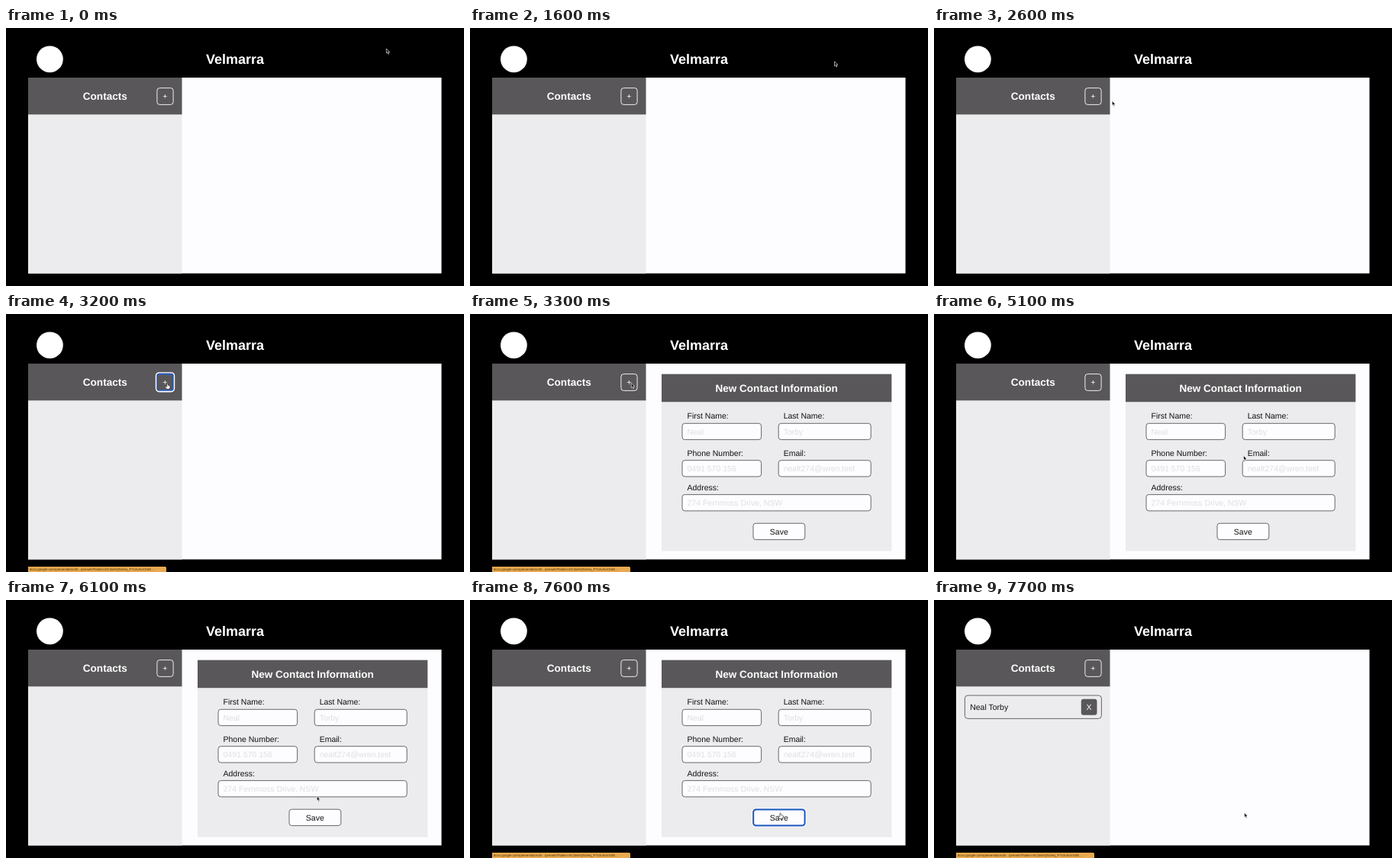
These frames come from a looping animation (600x338 px, 8000 ms). An HTML page:

```html
<!DOCTYPE html>
<html lang="en">
<head>
<meta charset="utf-8">
<title>Contacts</title>
<style>
  html, body { margin: 0; width: 100%; height: 100%; overflow: hidden; background: #000; }
  svg { display: block; width: 100vw; height: 100vh; }
  text { font: 10.5px "Liberation Sans", Arial, sans-serif; fill: #111; text-rendering: geometricPrecision; }
  .head { font-weight: bold; font-size: 13.55px; fill: #fff; text-anchor: middle; }
  .mid { text-anchor: middle; }
  .light { fill: #fff; }
  .hint { fill: #dfdee1; }
  .dark { fill: #595759; }
  .pale { fill: #ecebed; }
  .field { fill: #fdfcfe; stroke: #59585b; stroke-width: .9; }
  .ring { fill: none; stroke: #1c57c2; stroke-width: 2; }
  .halo { fill: none; stroke: #fff; stroke-width: 1.6; }
</style>
</head>
<body>
<svg viewBox="0 0 600 338">
  <rect width="600" height="338"/>
  <circle cx="57.4" cy="40.8" r="17.4" fill="#fff"/>
  <text class="head" x="300" y="47.3" style="font-size:18px">Velmarra</text>

  <rect x="29" y="65" width="541.5" height="256.5" fill="#fdfcfe"/>
  <rect class="pale" x="29" y="65" width="201.5" height="256.5"/>
  <rect class="dark" x="29" y="65" width="201.5" height="48.3"/>
  <text class="head" x="129.8" y="94">Contacts</text>
  <rect x="197.9" y="78.6" width="21.2" height="21.8" rx="3.5" fill="none" stroke="#fff" stroke-width=".9"/>
  <text class="mid light" x="208.4" y="93">+</text>
  <g id="plusFocus">
    <rect class="halo" x="196.6" y="77" width="23.8" height="24.6" rx="4"/>
    <rect class="ring" x="198.2" y="78.6" width="20.6" height="21.4" rx="3" style="stroke-width:1.6"/>
  </g>

  <g id="form">
    <rect class="pale" x="251" y="78.7" width="301.3" height="231.8"/>
    <rect class="dark" x="251" y="78.7" width="301.3" height="36.5"/>
    <text class="head" x="401.6" y="101.9">New Contact Information</text>
    <g id="fields"></g>
    <rect class="field" x="371" y="274.2" width="67.8" height="21.4" rx="3.5"/>
    <g id="saveFocus">
      <rect class="halo" x="369.8" y="273" width="70.2" height="23.8" rx="4.5"/>
      <rect class="ring" x="371.2" y="274.4" width="67.4" height="21.2" rx="3.5"/>
    </g>
    <text class="mid" x="404.8" y="288.8">Save</text>
  </g>

  <g id="entry">
    <rect class="field" x="40.4" y="125" width="179" height="30.4" rx="4" style="fill:#ecebed"/>
    <text x="47.2" y="144.2">Neal Torby</text>
    <rect class="dark" x="192.8" y="129.8" width="20.7" height="21" rx="3"/>
    <text class="mid light" x="203.1" y="144.2">X</text>
  </g>

  <g id="status">
    <path d="M29 338V331H208.5Q210 331 210 332.5V338Z" fill="#e9a94e"/>
    <text x="30.8" y="336.2" style="font-size:4.4px;fill:#4d3514">docs.google.com/presentation/d/.../present?token=AC4w5VjNzIeq_P7v3vAvChSE...</text>
  </g>

  <path id="arrow" d="M0 0V6L1.4 4.8L2.4 7.2L3.5 6.7L2.5 4.4H4.4Z" fill="#111" stroke="#fff" stroke-width=".6" stroke-linejoin="round"/>
  <path id="hand" d="M-.7 .8Q0 -.3 .7 .8V3Q1.7 2.5 2.1 3.3Q3.7 3 3.7 4.4Q3.7 6.2 2.6 7.8H-1L-2.9 5Q-2.8 3.8 -1.7 4.4L-.7 5.2Z" fill="#fff" stroke="#222" stroke-width=".6" stroke-linejoin="round"/>
</svg>
<script>
const $ = id => document.getElementById(id);
const LOOP = 8000, STEP = 100;

// label, hint, x, top of box, width
$('fields').innerHTML = [
  ['First Name:', 'Neal', 278, 143.3, 103.6],
  ['Last Name:', 'Torby', 404.2, 143.3, 121],
  ['Phone Number:', '0491 570 156', 278, 191.7, 103.6],
  ['Email:', 'nealt274@wren.test', 404.2, 191.7, 121],
  ['Address:', '274 Fernmoss Drive, NSW', 278, 236.6, 247.2]
].map(([label, hint, x, y, w]) => `
  <text x="${x + 6.5}" y="${y - 6}">${label}</text>
  <rect class="field" x="${x}" y="${y}" width="${w}" height="21.3" rx="3.5"/>
  <text class="hint" x="${x + 6.5}" y="${y + 14.6}">${hint}</text>`).join('');

const smooth = u => u * u * (3 - 2 * u);
const out = u => 1 - Math.pow(1 - u, 1.5);

// pointer moves: begin, end, x, y, easing
const moves = [
  [100, 300, 513, 32, smooth],
  [1500, 1900, 285.5, 107.5, smooth],
  [2100, 3000, 211.3, 90.5, out],
  [3900, 4400, 303, 148, out],
  [4600, 5400, 453, 203, smooth],
  [5700, 6100, 407.3, 257, smooth],
  [6200, 6700, 406.6, 278.8, smooth]
];

const clamp = v => Math.max(0, Math.min(1, v));

function pointer(t) {
  let x = 498.3, y = 27;
  for (const [a, b, tx, ty, ease] of moves) {
    const k = ease(clamp((t - a) / (b - a)));
    x += (tx - x) * k;
    y += (ty - y) * k;
  }
  return [x, y];
}

function show(id, on) {
  $(id).style.display = on ? '' : 'none';
}

function statusAlpha(t) {
  const ramp = (a, b) => clamp((t - a) / (b - a));
  return ramp(2800, 3200) - ramp(3500, 3800) + ramp(6800, 7200);
}

function draw(now) {
  const t = Math.floor(now % LOOP / STEP) * STEP;
  const [x, y] = pointer(t);
  const overPlus = t < 3300 && x < 219.5 && y > 78;
  const overSave = t > 6200 && t < 7700 && y > 274;
  const hover = overPlus || overSave;

  show('form', t >= 3300 && t < 7700);
  show('plusFocus', t === 3200);
  show('saveFocus', t === 7600);
  show('entry', t >= 7700);
  show('hand', hover);
  show('arrow', !hover);
  $('status').setAttribute('opacity', statusAlpha(t));
  for (const id of ['hand', 'arrow']) $(id).setAttribute('transform', `translate(${x} ${y})`);
}

const start = performance.now();
function tick() {
  draw(performance.now() - start);
  requestAnimationFrame(tick);
}
tick();
</script>
</body>
</html>
```
